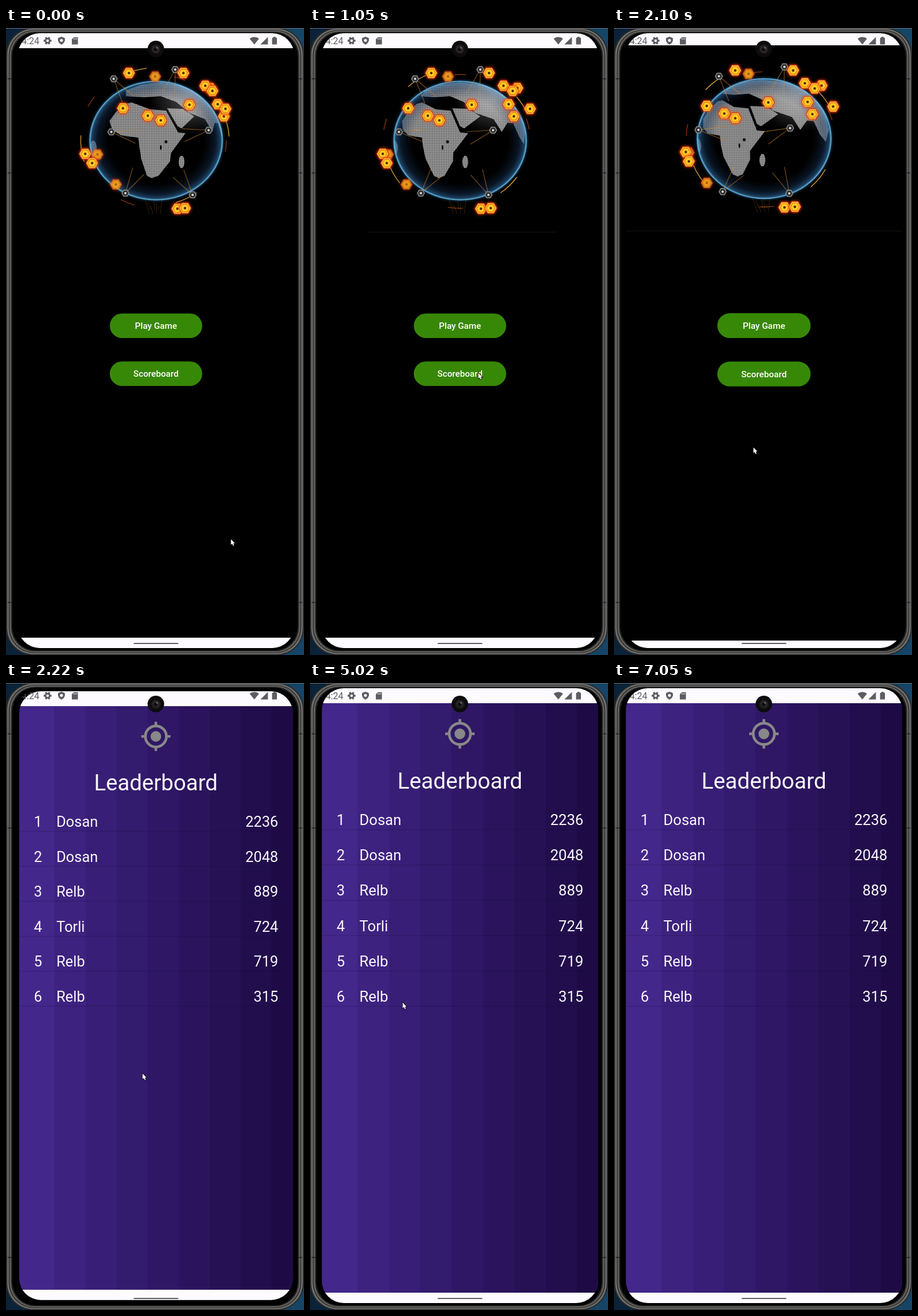
Recreate the animation shown at these times as an HTML page with a canvas. Size 516 by 1086 pixels, loop 8560 ms.

```html
<!DOCTYPE html>
<html lang="en">
<head>
<meta charset="utf-8">
<title>Leaderboard demo</title>
<style>
  html, body { margin: 0; width: 100%; height: 100%; overflow: hidden; background: #000; }
  canvas { display: block; width: 516px; height: 1086px; }
</style>
</head>
<body>
<canvas id="stage" width="516" height="1086"></canvas>
<script>
const ctx = document.getElementById('stage').getContext('2d');
const LOOP = 8560, BEAT = 129, TAU = Math.PI * 2;
const BOARD_BEAT = 17;

// Key points are [beat, values...]; a beat is one screen refresh
const POINTER = [[0, 389, 885], [3, 336, 734], [6, 297, 600], [8, 291, 597], [10, 290, 600],
  [13, 262, 679], [16, 241, 726], [17, 236, 676], [20, 262, 556], [23, 232, 319], [24, 202, 263],
  [27, 213, 311], [33, 251, 531], [36, 142, 549], [39, 160, 553], [41, 245, 584], [43, 386, 434],
  [45, 477, 433], [48, 473, 433], [50, 451, 597], [54, 483, 1100]];
const SPIN = [[0, 0], [8, 0.34], [14, 0.45]];
const MENU_ZOOM = [[14, 1], [16, 1.0098]];
const BOARD_ZOOM = [[17, 0.99], [19, 1]];

const SCORES = [['Dosan', 2236], ['Dosan', 2048], ['Relb', 889], ['Torli', 724], ['Relb', 719], ['Relb', 315]];

// Things on the globe are given where they appear once it has turned by a base angle
const GLOBE = { x: 260, y: 195, rx: 115, ry: 103 }, MID = 0.34;
const AFRICA = [190,146, 179,161, 184,176, 199,186, 229,190, 231,206, 234,226, 244,256, 252,260, 264,256,
  284,231, 286,216, 311,182, 298,181, 277,143, 250,141, 218,129, 206,131];
const ARABIA = [279,139, 306,140, 326,153, 304,174, 297,170];
const EURASIA = [192,118, 200,108, 226,98, 260,94, 300,99, 330,111, 352,131, 366,152, 373,180, 370,201,
  362,188, 352,165, 342,164, 332,180, 318,158, 286,147, 266,128, 242,118, 215,120];
const COINS = [204,152, 224,160, 170,139, 280,133, 353,153, 344,132, 210,78, 310,78, 359,104, 335,100,
  351,109, 381,140, 126,218, 133,234, 296,313, 313,312];
const DIM_COINS = [239,84, 135,219, 167,271];
const NODES = [295,72, 182,88, 154,180, 317,177, 192,286, 309,289];

function track(keys, beat) {
  if (beat <= keys[0][0]) return keys[0].slice(1);
  const i = keys.findIndex(k => k[0] > beat);
  if (i < 0) return keys[keys.length - 1].slice(1);
  const a = keys[i - 1], b = keys[i], f = (beat - a[0]) / (b[0] - a[0]);
  return a.slice(1).map((v, n) => v + (b[n + 1] - v) * f);
}
function seeded(seed) {
  return () => (seed = seed * 16807 % 2147483647) / 2147483647;
}

function shape(pts, fill) {
  ctx.beginPath();
  for (let i = 0; i < pts.length; i += 2) ctx.lineTo(pts[i], pts[i + 1]);
  ctx.closePath();
  ctx.fillStyle = fill; ctx.fill();
}
function box(x, y, w, h, r, fill) {
  ctx.beginPath(); ctx.roundRect(x, y, w, h, r);
  if (fill) { ctx.fillStyle = fill; ctx.fill(); }
}
function disc(x, y, r, fill, ry = r) {
  ctx.beginPath(); ctx.ellipse(x, y, r, ry, 0, 0, TAU);
  ctx.fillStyle = fill; ctx.fill();
}
function line(x1, y1, x2, y2, color, width) {
  ctx.beginPath(); ctx.moveTo(x1, y1); ctx.lineTo(x2, y2);
  ctx.strokeStyle = color; ctx.lineWidth = width; ctx.stroke();
}
function text(str, x, y, size, color, align = 'left', weight = 400) {
  ctx.font = `${weight} ${size}px Roboto, sans-serif`;
  ctx.textAlign = align; ctx.fillStyle = color;
  ctx.fillText(str, x, y);
}
function hexagon(x, y, r, fill) {
  const pts = [];
  for (let i = 0; i < 6; i++) pts.push(x + r * Math.cos(i * TAU / 6), y + r * Math.sin(i * TAU / 6));
  shape(pts, fill);
}

const dots = (() => {
  const tile = document.createElement('canvas');
  tile.width = tile.height = 3;
  const c = tile.getContext('2d');
  c.fillStyle = '#6c6c6c'; c.fillRect(0, 0, 3, 3);
  c.fillStyle = '#a6a6a6'; c.fillRect(0, 0, 2, 2);
  return ctx.createPattern(tile, 'repeat');
})();

// Turn a point about the vertical axis, on a shell at least `shell` globe radii wide
function turn(px, py, angle, shell = 1) {
  const dx = (px - GLOBE.x) / GLOBE.rx, dy = (py - GLOBE.y) / GLOBE.ry;
  const r = Math.max(shell, Math.hypot(dx, dy));
  const ring = Math.sqrt(Math.max(1e-6, r * r - dy * dy));
  let lon = Math.asin(Math.max(-1, Math.min(1, dx / ring))) - angle;
  if (shell === 1) lon = Math.max(-TAU / 4, Math.min(TAU / 4, lon));
  return [GLOBE.x + GLOBE.rx * ring * Math.sin(lon), py];
}
function eachTurned(pts, angle, shell, visit) {
  for (let i = 0; i < pts.length; i += 2) visit(...turn(pts[i], pts[i + 1], angle, shell));
}
function land(pts, angle) {
  const moved = [];
  eachTurned(pts, angle, 1, (x, y) => moved.push(x, y));
  shape(moved, dots);
}

function coin(x, y) {
  ctx.shadowColor = '#ff3a00'; ctx.shadowBlur = 5;
  hexagon(x, y, 11, '#e2490a');
  ctx.shadowBlur = 0;
  hexagon(x, y, 9.6, '#ffd84a');
  hexagon(x, y, 8, '#dd5a08');
  hexagon(x, y, 7, '#ffcb22');
  disc(x, y, 2.2, '#5a2a08');
}
function node(x, y) {
  hexagon(x, y, 7, '#8c8c8c');
  hexagon(x, y, 5.2, '#2e2e2e');
  disc(x, y, 2, '#d8d8d8');
}
function rays(x, y) {
  const aim = Math.atan2(GLOBE.y - y, GLOBE.x - x);
  for (const spread of [-0.25, 0.25])
    line(x, y, x + 46 * Math.cos(aim + spread), y + 46 * Math.sin(aim + spread), 'rgba(214,135,40,.6)', 1.1);
}

function streaks(angle) {
  const rand = seeded(77);
  ctx.lineCap = 'round';
  for (let i = 0; i < 8; i++) {
    const from = i * TAU / 8 + rand() * 0.5 - angle, size = 1.03 + rand() * 0.2;
    ctx.beginPath();
    ctx.ellipse(GLOBE.x, GLOBE.y, GLOBE.rx * size, GLOBE.ry * size * 1.05, 0, from, from + 0.12 + rand() * 0.25);
    ctx.strokeStyle = i % 2 ? '#d9a03a' : '#8a3a10'; ctx.lineWidth = 1.3; ctx.stroke();
  }
  ctx.lineCap = 'butt';
  for (let i = 0; i < 7; i++)
    line(240 + i * 5, 296 + i % 3 * 6, 249 + i * 3, 322 - i % 2 * 7, 'rgba(190,120,30,.25)', 1);
}

function globe(angle) {
  const { x, y, rx, ry } = GLOBE;
  const oval = () => { ctx.beginPath(); ctx.ellipse(x, y, rx, ry, 0, 0, TAU); };
  ctx.save();
  ctx.shadowColor = '#2580bc'; ctx.shadowBlur = 5;
  disc(x, y, rx, '#000', ry);
  ctx.restore();

  ctx.save();
  oval(); ctx.clip();
  land(AFRICA, angle);
  land(ARABIA, angle);
  land(EURASIA, angle - MID);
  disc(...turn(304, 232, angle), 5, dots, 11);
  disc(...turn(151, 208, angle), 6, dots, 13);
  disc(...turn(277, 197, angle), 2.6, '#000');
  disc(...turn(268, 207, angle), 1.4, '#000', 4);
  ctx.translate(x, y); ctx.scale(rx, ry);
  const rim = ctx.createRadialGradient(0, 0, 0.72, 0, 0, 1);
  rim.addColorStop(0, 'rgba(18,40,70,0)');
  rim.addColorStop(0.6, 'rgba(24,54,92,.4)');
  rim.addColorStop(0.9, 'rgba(46,110,165,.6)');
  rim.addColorStop(1, 'rgba(130,205,245,.95)');
  ctx.fillStyle = rim; ctx.fillRect(-1, -1, 2, 2);
  const shine = ctx.createRadialGradient(0.5, -0.7, 0, 0.5, -0.7, 0.6);
  shine.addColorStop(0, 'rgba(255,255,255,.3)');
  shine.addColorStop(1, 'rgba(255,255,255,0)');
  ctx.fillStyle = shine; ctx.fillRect(-1, -1, 2, 2);
  ctx.restore();
  oval(); ctx.strokeStyle = '#58a9d4'; ctx.lineWidth = 1.2; ctx.stroke();

  streaks(angle);
  eachTurned(NODES, angle - MID, 1.1, (nx, ny) => { rays(nx, ny); node(nx, ny); });
  ctx.globalAlpha = 0.45;
  eachTurned(DIM_COINS, angle - MID, 1.19, coin);
  ctx.globalAlpha = 1;
  eachTurned(COINS, angle - MID, 1.19, coin);
}

function button(label, y) {
  box(179.7, y, 160, 42.6, 21.3, '#378807');
  text(label, 259.7, y + 26.9, 15.2, '#fff', 'center', 500);
}

function menu(beat) {
  globe(track(SPIN, beat)[0]);
  if (beat >= 14) line(20, 353.5, 499, 353.5, '#131313', 1);
  else if (beat >= 4) line(98, 353.5, 426, 353.5, '#131313', 1);
  button('Play Game', 494.5);
  button('Scoreboard', 577.5);
}

function board() {
  const left = [68, 39, 139], right = [30, 11, 70];
  for (let i = 0; i < 9; i++) {
    const f = (i / 8) ** 0.85;
    ctx.fillStyle = `rgb(${left.map((v, n) => v + (right[n] - v) * f)})`;
    const x = i ? Math.round(28 + i * 54.3) : 0;
    ctx.fillRect(x, 35, 516 - x, 1021);
  }
  const cx = 259.5, cy = 88, grey = '#888';
  ctx.beginPath(); ctx.arc(cx, cy, 18.4, 0, TAU);
  ctx.strokeStyle = grey; ctx.lineWidth = 4.6; ctx.stroke();
  disc(cx, cy, 9.3, grey);
  for (const s of [-1, 1]) {
    line(cx + s * 19, cy, cx + s * 25.5, cy, grey, 4.6);
    line(cx, cy + s * 19, cx, cy + s * 25.5, grey, 4.6);
  }
  const ink = '#f8f6fc';
  text('Leaderboard', 259.5, 182.5, 38.5, ink, 'center');
  SCORES.forEach(([name, points], i) => {
    const y = 246 + i * 61.2;
    text(i + 1, 46, y, 25.6, ink);
    text(name, 85.5, y, 25.6, ink);
    text(points, 473.5, y, 25.6, ink, 'right');
    line(20, y + 8, 487, y + 8, 'rgba(15,5,50,.25)', 1);
  });
}

function statusIcons() {
  const ink = '#5d5c61', paper = '#fdfbff';
  text('4:24', 27, 28, 16, ink);
  for (let i = 0; i < 3; i++) {
    const a = i * TAU / 6, dx = Math.cos(a) * 6.7, dy = Math.sin(a) * 6.7;
    line(72 - dx, 22 - dy, 72 + dx, 22 + dy, ink, 3.4);
  }
  disc(72, 22, 5, ink);
  disc(72, 22, 2.2, paper);
  shape([96,15, 102,17.5, 102,22, 100,26, 96,29, 92,26, 90,22, 90,17.5], ink);
  disc(96, 21.5, 2.5, paper);
  shape([117.5,16, 124.5,16, 124.5,28.5, 114,28.5, 114,19.5], ink);
  for (let i = 0; i < 3; i++) line(117.5 + i * 2.4, 17.5, 117.5 + i * 2.4, 20, paper, 1);
  ctx.beginPath(); ctx.moveTo(430, 28.5); ctx.lineTo(421.8, 18.5);
  ctx.quadraticCurveTo(430, 12.5, 438.2, 18.5); ctx.fillStyle = ink; ctx.fill();
  shape([453.5,15.5, 453.5,28.5, 440.5,28.5], ink);
  box(460.7, 16.8, 8.4, 11.8, 1.2, ink);
  ctx.fillRect(463, 15.3, 4, 2);
}

function phone() {
  const back = ctx.createLinearGradient(0, 0, 516, 0);
  back.addColorStop(0, '#0a2238'); back.addColorStop(1, '#164567');
  ctx.fillStyle = back; ctx.fillRect(0, 0, 516, 1086);
  const rims = ['#2c2c2b', '#777572', '#3a3a39', '#666462', '#222', '#000'];
  rims.forEach((color, i) => {
    const n = i * 2.2, v = i * 1.6;
    box(n, v, 516 - 2 * n, 1086 - 2 * v, 46 - n / 2, color);
  });
  for (const y of [88, 251, 995])
    for (const x of [3, 507]) line(x, y, x + 6, y, 'rgba(20,20,20,.6)', 2);
  line(0, 0.5, 516, 0.5, '#6b6d70', 1);
}

function camera() {
  disc(259.5, 36.3, 14.3, '#0c0c0d');
  disc(259.5, 36.5, 8, '#1e1b1c');
  disc(259.5, 36.5, 5.6, '#352d30');
  disc(259, 37, 3.6, '#120e10');
  disc(261.5, 34.5, 1.2, '#8a8286');
}

function pointer(x, y) {
  ctx.save();
  ctx.translate(x + 0.5, y + 0.5);
  shape([0,0, 0,9.6, 2.2,7.7, 3.8,11.2, 5.4,10.5, 3.9,7.1, 6.8,6.9], '#fff');
  ctx.strokeStyle = 'rgba(0,0,0,.85)'; ctx.lineWidth = 1.6; ctx.stroke();
  ctx.fill();
  ctx.restore();
}

function draw(beat) {
  const onBoard = beat >= BOARD_BEAT;
  const [zoom] = track(onBoard ? BOARD_ZOOM : MENU_ZOOM, beat);
  phone();
  ctx.save();
  box(20.5, 9, 478.5, 1065, 38); ctx.clip();
  ctx.save();
  ctx.fillStyle = '#000'; ctx.fillRect(0, 0, 516, 1086);
  ctx.translate(259.75, 545.5); ctx.scale(zoom, zoom); ctx.translate(-259.75, -545.5);
  if (zoom < 1) { box(20.5, 9, 478.5, 1065, 38); ctx.clip(); }
  if (onBoard) board(); else menu(beat);
  ctx.fillStyle = '#fdfbff';
  ctx.fillRect(0, 0, 516, 35);
  ctx.fillRect(0, 1056, 516, 30);
  ctx.restore();
  statusIcons();
  box(221, 1065, 77.5, 2, 1, '#5f5e60');
  ctx.restore();
  camera();
  pointer(...track(POINTER, beat));
}

const start = performance.now();
function frame() {
  const t = (performance.now() - start) % LOOP;
  draw(Math.floor((t + 15) / BEAT));
  requestAnimationFrame(frame);
}
frame();
</script>
</body>
</html>
```
